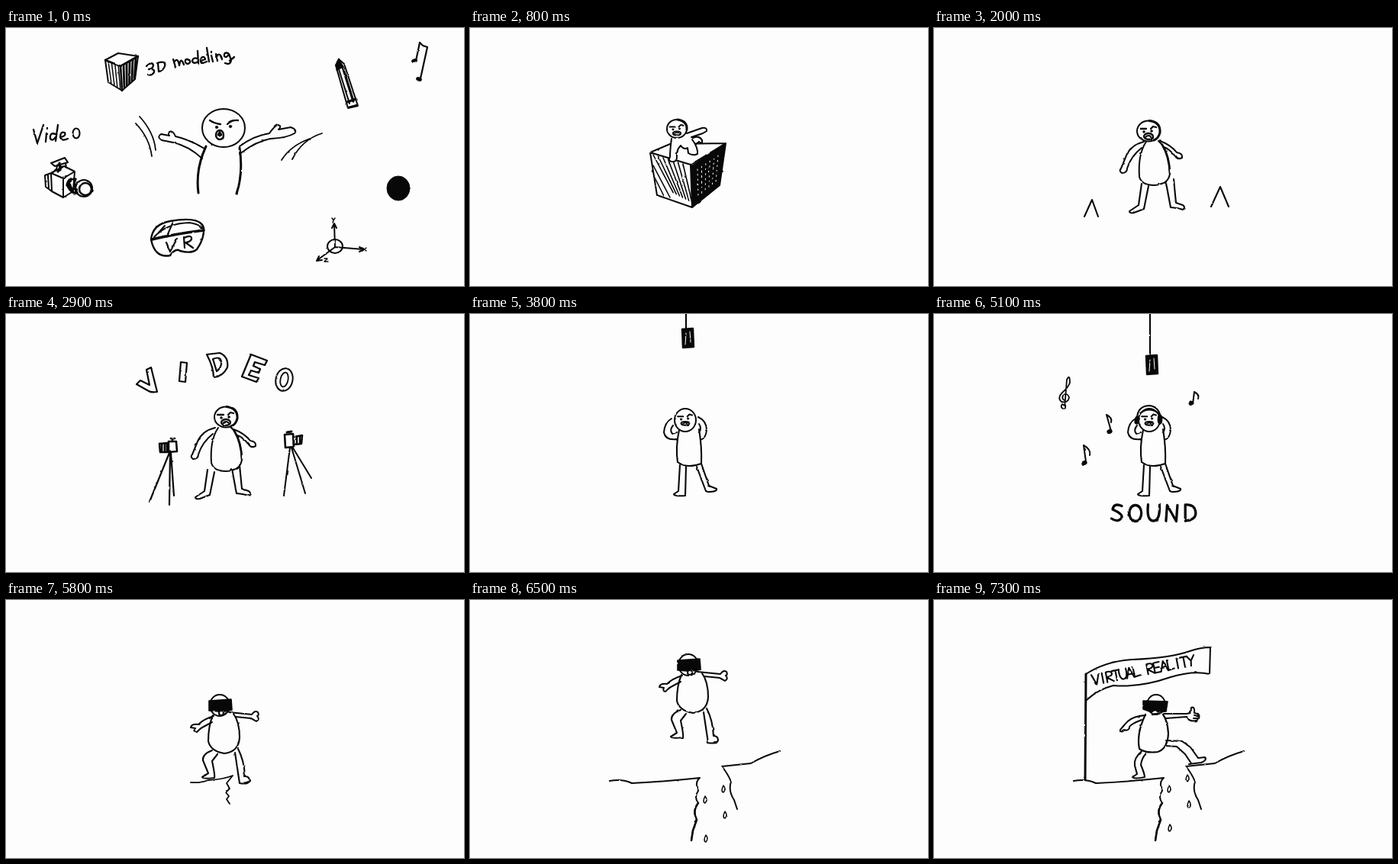
Animation of 600x338 px, one loop 7500 ms. Source, as an HTML page:

```html
<!DOCTYPE html>
<html lang="en">
<head>
<meta charset="utf-8">
<title>Doodle: 3D modeling, video, sound, virtual reality</title>
<style>
html, body { margin: 0; width: 100%; height: 100%; overflow: hidden; background: #fdfdfd; }
svg { display: block; width: 100vw; height: 100vh; }
</style>
</head>
<body>
<svg viewBox="0 0 600 338" fill="none" stroke="#080808" stroke-linecap="round" stroke-linejoin="round">
  <filter id="rough" filterUnits="userSpaceOnUse" x="0" y="0" width="600" height="338" color-interpolation-filters="sRGB">
    <feTurbulence type="fractalNoise" baseFrequency="0.12" numOctaves="2" seed="4"/>
    <feDisplacementMap in="SourceGraphic" scale="2" xChannelSelector="R" yChannelSelector="G"/>
  </filter>
  <g id="stage" filter="url(#rough)"></g>
</svg>
<script>
const LOOP = 7500, PAPER = '#fdfdfd', INK = '#080808';

const line = (d, w = 2, fill = 'none') => `<path d="${d}" stroke-width="${w}" fill="${fill}"/>`;
const solid = d => line(d, 1.2, INK);
const oval = (x, y, rx, ry, w = 2, fill = 'none', rot = 0) =>
  `<ellipse cx="${x}" cy="${y}" rx="${rx}" ry="${ry}" stroke-width="${w}" fill="${fill}" transform="rotate(${rot} ${x} ${y})"/>`;
const dot = (x, y, r = 1.4) => oval(x, y, r, r, 0.6, INK);
const at = (x, y, art, rot = 0, s = 1) => `<g transform="translate(${x} ${y}) rotate(${rot}) scale(${s})">${art}</g>`;
const turn = (a, x, y, art) => `<g transform="rotate(${a} ${x} ${y})">${art}</g>`;
const range = n => [...Array(n).keys()];

// Pen-stroke capitals, centred on 0,0 and 14 units tall
const glyphs = {
  3: 'M-4 -6Q4 -9 4 -4Q3 0 -1 0Q5 0 4 4Q1 9 -5 6', A: 'M-5 7L0 -7L5 7M-3 2L3 2',
  D: 'M-4 -7L-4 7Q6 6 5 -1Q4 -8 -4 -7', E: 'M4 -7L-4 -7L-4 7L4 7M-4 0L3 0',
  G: 'M4 -5Q-4 -10 -5 0Q-4 9 4 6L4 1L0 1', I: 'M0 -7L0 7', L: 'M-4 -7L-4 7L4 6',
  M: 'M-6 7L-4 -7L0 3L4 -7L6 7', N: 'M-5 7L-4 -7L4 7L5 -7',
  O: 'M0 -7C-7 -7 -7 7 0 7C7 7 7 -7 0 -7', R: 'M-4 7L-4 -7Q5 -8 4 -3Q3 0 -4 0L5 7',
  S: 'M4 -6Q-3 -9 -4 -3Q5 1 4 4Q1 9 -5 5', T: 'M-5 -7L5 -7M0 -7L0 7',
  U: 'M-5 -7Q-6 7 0 7Q6 7 5 -7', V: 'M-5 -7L0 7L5 -7', Y: 'M-5 -7L0 0L5 -7M0 0L-1 7'
};
const word = (text, spot, s, w) => [...text].map((c, i) => {
  const [x, y, rot] = spot(i);
  return c === ' ' ? '' : at(x, y, line(glyphs[c], w / s), rot, s);
}).join('');

// --- opening page
const cubeIcon = line('M130 42L147 33L173 37L169 67L152 82L134 71Z')
  + line('M130 42L150 50L173 37M150 50L152 82', 2.6)
  + range(4).map(i => line(`M${134 + i * 4.4} ${44 + i * 1.8}L${138 + i * 3.9} ${72 + i * 2.6}`, 1.5)).join('')
  + range(5).map(i => line(`M${154 + i * 4} ${49 - i * 2.4}L${155 + i * 3.3} ${78 - i * 2.8}`, 2.8)).join('');
const modeling = line('M184 50Q192 43 193 49Q192 54 187 54Q195 53 194 58Q191 63 186 61M199 46L200 57M198 46Q210 42 208 50Q206 56 200 57M219 41L222 51M220 45Q225 37 227 49Q229 37 233 48M240 42Q234 39 235 45Q238 49 241 45Q242 42 238 41M251 30L252 46M251 40Q245 38 244 43Q245 48 252 44', 2.3)
  + line('M255 43L261 41Q260 36 256 39Q253 44 258 46L263 44M263 26L266 44M269 36L271 44M269 31L269 32M275 34L277 43M275 37Q281 31 283 41M291 33Q285 31 286 37Q289 40 292 34L295 42Q294 49 287 46M293 43L299 38', 2.3);
const videoWord = line('M36 133L41 151L49 127M53 138L52 149M54 131L54 132M68 127L65 148M65 139Q57 136 58 145Q61 149 65 143M71 143Q79 142 77 137Q71 135 71 143Q73 149 81 145', 2.3)
  + oval(92, 138, 4.5, 6.5, 2.1);
const pencil = line('M436 41L432 49L448 105L461 102L443 47Z') + solid('M436 40L432 48L434 55L442 51Z')
  + line('M436 54L450 99', 2) + line('M441 51L455 96', 3.2) + line('M447 97L458 93', 3.2) + line('M449 104L460 101', 2.6);
const pairNote = line('M542 19L537 43M542 19L546 23L552 25L543 66', 2.2) + oval(535, 43, 3.4, 2, 1.2, INK, -20) + oval(541, 67, 3.4, 2, 1.2, INK, 20);
const movieCamera = line('M59 190L76 181L90 188L88 214L75 222L60 214ZM59 190L75 197L90 188M75 197L75 222M59 190L51 193L52 208L60 214M65 187L68 179M79 183L78 177M55 193L56 210')
  + line('M59 177L77 170L81 176L64 181Z', 2.2) + line('M68 188L73 182M70 177L71 186', 3.2)
  + line('M80 206Q82 196 89 198M81 207Q86 217 92 216M85 199Q81 204 87 212M91 198Q87 205 93 216', 3.4)
  + oval(102, 210, 11, 11, 2.2) + oval(104, 211, 8, 8, 2.6);
const goggles = line('M190 277Q192 257 215 253Q255 246 259 262Q260 276 250 290Q243 296 228 292Q222 288 215 298Q195 302 190 277Z', 2.4)
  + line('M191 277Q220 270 259 265', 3.4) + line('M194 274Q210 256 240 255Q254 257 258 263M200 268L208 259M212 270L218 256')
  + line('M210 281L215 293L224 276M233 274L234 288M233 275Q244 270 243 277Q240 281 235 281L245 288', 2.2);
const axes = oval(431, 286, 10, 9) + line('M431 287L430 257M427 262L430 256L433 262M431 287L468 290M463 287L469 290L463 293M431 287L408 304M410 299L407 305L414 304', 2)
  + line('M427 249L429 252L431 249M429 252L428 255M467 288L472 292M472 288L467 292M417 302L421 302L417 306L422 306', 1.4);
const badge = oval(514, 210, 15, 16, 1, INK);
const icons = cubeIcon + modeling + videoWord + pencil + pairNote + movieCamera + goggles + axes + badge;

const swish = line('M175 116Q194 137 196 160M170 125Q188 144 191 168M398 145Q373 154 361 173M414 138Q388 146 375 172', 1.8);
const big = flap => oval(285, 131, 28, 25)
  + line('M262 155Q248 185 252 216M306 157Q311 190 302 217', 3)
  + turn(flap, 262, 158, line('M260 158Q240 146 222 142Q219 134 214 136Q212 140 214 141L203 139Q197 143 204 147L219 150Q240 155 257 171'))
  + turn(-flap, 306, 158, line('M306 155Q325 141 345 138Q352 128 356 127Q362 128 357 133L373 130Q382 133 378 138Q368 144 347 145Q328 148 306 165'))
  + line('M267 121Q273 125 281 126M290 126Q296 120 304 121', 2.3) + dot(276, 130, 1.8) + dot(294, 129, 1.8)
  + oval(280, 140, 5, 6, 2.4) + solid('M277 140L280 135L283 140L280 142Z');

// --- cube
const cube = line('M236 163L262 152L335 151L289 179ZM236 163L245 219L291 235L289 179M291 235L327 206L335 151', 2, PAPER);
const shading = line('M290 181L334 152L326 205L292 233Z', 2.2, INK)
  + `<g stroke="${PAPER}" stroke-dasharray="1.5 5">`
  + range(6).map(i => line(`M${298 + i * 5.4} ${185 - i * 3.6}L${299 + i * 4.6} ${221 - i * 3.7}`, 1)).join('') + '</g>'
  + range(7).map(i => line(`M${240 + i * 6.5} ${166 + i * 2}L${247 + i * 7.3 + (6 - i) * 3.2} ${200 + i * 4.7 + (6 - i) * 2.6}`, 1.6)).join('')
  + line('M240 180L262 222M243 198L254 220', 1.6);
const face = (x, y, mouth = 4) => at(x, y, line('M-11 -3L-3 -3M3 -3L6 -6L10 -5', 2.3) + dot(-6, 1) + dot(4, 0)
  + oval(0, 7, 6, mouth, 2.3) + line('M-4 8Q0 4 4 8', 1.8));
const crawler = line('M284 138L304 131Q311 130 310 135L305 138L290 143', 2, PAPER)
  + line('M292 144Q300 140 304 147Q305 153 300 149L295 153', 2.2)
  + line('M264 145Q262 160 262 169Q259 174 264 175Q271 176 271 169Q270 160 276 154Q280 160 285 157L286 164Q292 168 298 165Q299 157 291 146', 2, PAPER)
  + oval(271, 132, 13, 12, 2, PAPER) + line('M272 120Q285 122 284 133', 3)
  + at(271, 132, face(0, 0, 3), 0, 0.85);
const title = n => word('3D MODELING'.slice(0, n), i => {
  const u = (160 + 28.5 * i - 302) / 150;
  return [160 + 28.5 * i, 66 + 70 * u * u, 36 * u];
}, 1.6, 2.6);

// --- video; lean 0..1 shifts the weight from one foot to the other
const stand = (lean = 0) => line('M278 149Q267 165 269 195Q272 206 288 206Q308 205 309 190Q308 160 294 148')
  + line('M299 153Q308 168 309 190', 2.7)
  + at(-lean, 0, line('M275 149Q258 153 252 167L245 184Q242 187 246 190Q253 190 253 184Q258 168 272 157'))
  + at(2 * lean, 3 * lean, line('M296 148Q310 153 318 163Q326 164 325 170Q319 173 316 168Q308 158 301 156'))
  + at(-8 * lean, 0, line('M272 204L268 232L256 240Q256 243 262 242L275 237L281 207M304 203L310 235Q320 236 326 238Q330 235 326 232L317 229L314 198', 2.1))
  + at(7 * lean, 0, oval(281, 135, 15, 13.5, 2, PAPER) + line('M282 121.5Q297 123 296 137Q294 145 288 147', 3) + face(281, 135));
const tips = line('M197 247L207 225L215 247M363 234L375 208L386 234', 2.1);
const halfLegs = line('M188 246L211 195L214 250M364 238L373 190L392 235', 2.1);
const pieces = [
  [184, 87, line('M171 92L176 87L188 93L184 73L190 70L198 102Q190 103 187 101Z', 2.2)],
  [232, 76, line('M229 63L237 64L235 89L227 88Z', 2.2)],
  [276, 67, line('M263 53L280 51Q292 56 290 70Q284 82 272 83Q272 70 263 53ZM271 59Q283 54 282 66Q280 73 276 75Z', 2.2)],
  [325, 71, line('M321 53L342 61L339 67L326 63L324 68L333 72L331 77L321 74L318 80L331 84L328 89L309 82Z', 2.3)],
  [365, 86, oval(364.5, 86, 11, 15, 2, 'none', 12) + oval(364.5, 86, 5, 9.5, 1.8, 'none', 12)],
  [204, 208, line('M201 170L211 169L211 181L202 181ZM213 167L223 167L224 180L213 181Z', 2.6) + line('M204 171L204 180M208 171L208 180', 2.8)
    + line('M216 163L221 163M218 163L218 167', 2.6) + line('M214 182L188 246M215 182L214 250M216 182L220 238', 2.2)],
  [381, 196, line('M365 158L376 157L377 174L366 175Z', 2.6) + line('M377 161L388 159L387 170L377 171Z', 2.6) + line('M381 161L381 170M385 161L385 169', 2.4)
    + line('M368 155L374 154', 2.8) + line('M372 175L364 238M374 175L392 235M375 174L400 215')]
];
const spread = (k, bob = 0) => pieces.map(([x, y, art], i) =>
  at((x - 290) * (k - 1), (y - 150) * (k - 1) * 0.3 + (i < 5 ? bob * (i % 2 ? -1 : 1) : 0), art)).join('');

// --- sound
const listener = phones => line('M274 152Q269 175 272 194Q284 203 303 196Q304 175 300 151', 2.1)
  + line('M264 137Q255 142 254 155Q256 166 271 164M266 146Q261 152 265 157L271 155M299 135Q310 140 310 152Q309 163 302 165M300 144Q304 150 300 155')
  + line('M275 198L273 232L267 236Q267 239 282 238L283 200M303 196L313 225L323 229Q324 233 312 233L309 232L297 200', 2.1)
  + oval(282, 139, 14, 15, 2, PAPER) + at(282, 137, face(0, 0, 2.6), 0, 0.9)
  + (phones ? line('M266 136Q267 120 283 120Q295 122 297 136M270 130Q282 121 294 130') + oval(266, 139, 2.6, 5, 1.5, INK, 12) + oval(296, 138, 2.6, 6, 1.5, INK) : '');
const mic = y => at(0, y - 112, line('M283 -60L283 87', 2.2) + line('M278 87L292 86L293 110L279 111Z', 2.4, INK)
  + `<path stroke="${PAPER}" d="M283 92L282 107M288 90L289 104"/>`);
const sound = n => word('SOUND'.slice(0, n), i => [240 + 23.8 * i, 261 - (i % 2 ? 0 : 0.5), i === 2 ? 2 : 0], 1.5, 3.3);
const clef = line('M169 128Q165 126 168 122Q172 124 171 128L174 90Q178 82 178 94Q176 100 168 107Q161 114 167 119Q176 121 177 113Q174 106 169 111Q167 115 171 117', 1.8);
const note = (hx, hy, tx, ty, fx, fy, r) => line(`M${hx + r * 0.7} ${hy}L${tx} ${ty}Q${fx + 2} ${(ty + fy) / 2 - 1} ${fx} ${fy}`) + oval(hx, hy, r, r * 0.75, 1, INK, -20);
const notes = [
  clef, note(230, 150, 226, 128, 232, 138, 3.2), note(337, 121, 341, 106, 346, 115, 3), note(197, 191, 196, 168, 204, 181, 3.2),
  note(386, 158, 384, 144, 389, 151, 2.4),
  line('M371 212L381 206L389 205L378 218') + oval(371, 213, 3, 1.8, 1, INK) + oval(378, 219, 3, 1.8, 1, INK)
];
const music = (n, sway = 0) => notes.slice(0, n).map((art, i) => at(0, sway * (i % 2 ? 1 : -1), art)).join('');

// --- virtual reality
const headset = line('M266 132L295 130L296 144L288 146L284 143L278 146L266 145Z', 1.6, INK);
const balancer = (vr = true) => line('M271 151Q265 165 265 185Q268 198 286 201Q305 199 306 180Q306 160 298 149', 2.1)
  + line('M272 152Q259 156 252 163Q243 162 242 167L248 168Q246 172 250 173Q255 168 257 167L270 160M292 147L322 150Q326 144 330 147Q332 151 329 152Q333 156 328 159Q323 156 321 155L301 153')
  + line('M270 197Q257 202 258 210L265 227L257 232Q258 235 273 233Q274 230 270 211L277 202M300 200L306 240Q317 242 319 237Q319 231 313 231Q312 210 304 195', 2.1)
  + oval(280, 138, 13, 14, 2, PAPER) + (vr ? headset + oval(282, 148, 3, 3, 2.2) : face(280, 138, 3));
const firstCrack = line('M242 239Q255 240 265 236Q285 235 297 230L293 235L289 240L293 247L288 252L292 257L289 261L293 267', 1.8);
const leftBank = line('M183 237Q200 234 212 240Q255 238 301 233Q294 239 299 250Q293 258 299 266Q291 276 297 288L292 302L290 315') + line('M299 266Q291 276 297 288L292 302L290 315', 2.5);
const rightBank = line('M406 198Q385 204 368 214L330 218Q338 228 342 238Q338 250 346 262L350 274');
const stone = (x, y) => line(`M${x} ${y - 5}Q${x - 4} ${y + 3} ${x} ${y + 4}Q${x + 4} ${y} ${x} ${y - 5}Z`, 1.6);
const stones = fall => stone(308, 248 + fall) + stone(332, 234 + fall) + stone(334, 268 + fall) + stone(309, 299 + fall);
const gap = fall => leftBank + rightBank + stones(fall);
const banner = line('M199 97Q225 80 260 78Q310 76 335 67Q350 62 362 62L361 97Q340 92 310 101Q270 115 235 112Q215 117 200 131')
  + line('M199 97L198 236', 3)
  + word('VIRTUAL REALITY', i => [212 + 8.9 * i, 104 - 1.75 * i, -11], 0.95, 2.1);
const hands = [
  'M331 149Q338 146 345 149Q349 153 344 157Q336 159 331 153',
  'M331 149Q336 149 338 145Q342 144 341 149L346 150Q348 156 343 158Q335 159 331 153',
  'M331 149Q337 149 337 141Q342 139 341 148L346 149Q349 152 346 157Q340 160 334 157L331 153M341 151L346 152M340 155L345 155'
];
const strider = hand => line('M277 150Q265 175 269 195Q278 201 293 199Q306 195 307 175Q306 158 300 150', 2.2)
  + line('M277 151Q258 152 250 163L244 170Q245 175 250 170Q253 172 256 168Q254 164 272 157M301 149L331 149M304 155L331 153' + hands[hand])
  + line('M272 198Q261 208 263 217L266 228L260 232Q262 235 276 232Q276 228 271 216Q272 207 278 201M304 184L325 185L336 193L346 207L355 206Q358 210 350 213L334 215M303 191L318 192L329 202L337 214', 2.1)
  + oval(291, 137, 12, 13, 2, PAPER) + line('M274 132L306 133L304 146L294 147L290 144L285 147L274 143Z', 1.6, INK) + line('M286 150L293 149', 2.4);

const onCube = cube + shading + crawler;
const singing = listener(true) + mic(112);
const scenes = [
  [0, big(0) + swish + icons],
  [200, big(14) + at(0, -8, swish)],
  [500, big(-10) + at(0, 10, swish)],
  [600, at(112, 60, big(10), 0, 0.6)],
  [700, cube + at(0, -26, crawler)],
  [800, onCube],
  [1000, onCube + title(5)],
  [1100, onCube + title(8)],
  [1300, onCube + title(10)],
  [1400, onCube + title(11)],
  [1700, onCube + title(2)],
  [1800, at(0, -6, stand())],
  [2000, stand() + tips],
  [2100, stand() + halfLegs],
  [2200, stand() + spread(1, 3)],
  [2500, stand(0.5) + spread(1, -3)],
  [2600, stand(1) + spread(1, 2)],
  [2700, stand(1) + spread(1, -2)],
  [2900, stand(1) + spread(1)],
  [3000, stand(1) + spread(1.5)],
  [3100, stand(1) + spread(2.1)],
  [3300, stand(1) + spread(2.9)],
  [3500, stand(1) + spread(3.7)],
  [3600, listener(false)],
  [3800, listener(false) + mic(45)],
  [3900, listener(true) + mic(84)],
  [4100, singing + sound(2)],
  [4200, singing + sound(5)],
  [4400, singing + sound(5) + music(2)],
  [4500, singing + sound(5) + music(4)],
  [4600, singing + sound(5) + music(6)],
  [4800, singing + sound(5) + music(6, 7)],
  [5000, listener(true) + mic(104) + sound(5) + music(6, -4)],
  [5100, listener(true) + mic(80) + sound(5) + music(4, 4)],
  [5200, listener(true) + mic(50) + sound(3) + music(2)],
  [5300, listener(true) + mic(24)],
  [5500, balancer(false) + at(0, -90, headset)],
  [5600, balancer()],
  [5800, balancer() + firstCrack],
  [5900, balancer() + firstCrack + line('M293 267L289 276L293 284L290 292M330 218Q350 214 389 205')],
  [6100, at(0, -8, balancer()) + gap(-14)],
  [6200, at(0, -28, balancer()) + gap(-6)],
  [6300, at(2, -48, balancer()) + gap(4)],
  [6500, at(6, -53, balancer()) + gap(14)],
  [6700, at(10, -61, balancer()) + gap(24)],
  [6900, strider(0) + gap(10) + banner],
  [7000, strider(0) + gap(0) + banner],
  [7200, strider(1) + gap(0) + banner],
  [7300, strider(2) + gap(0) + banner]
];

const stage = document.getElementById('stage');
let shown = -1;
function draw(now) {
  const t = now % LOOP;
  const i = scenes.findLastIndex(s => s[0] <= t);
  if (i !== shown) stage.innerHTML = scenes[shown = i][1];
}
const start = performance.now();
function tick() {
  draw(performance.now() - start);
  requestAnimationFrame(tick);
}
tick();
</script>
</body>
</html>
```
